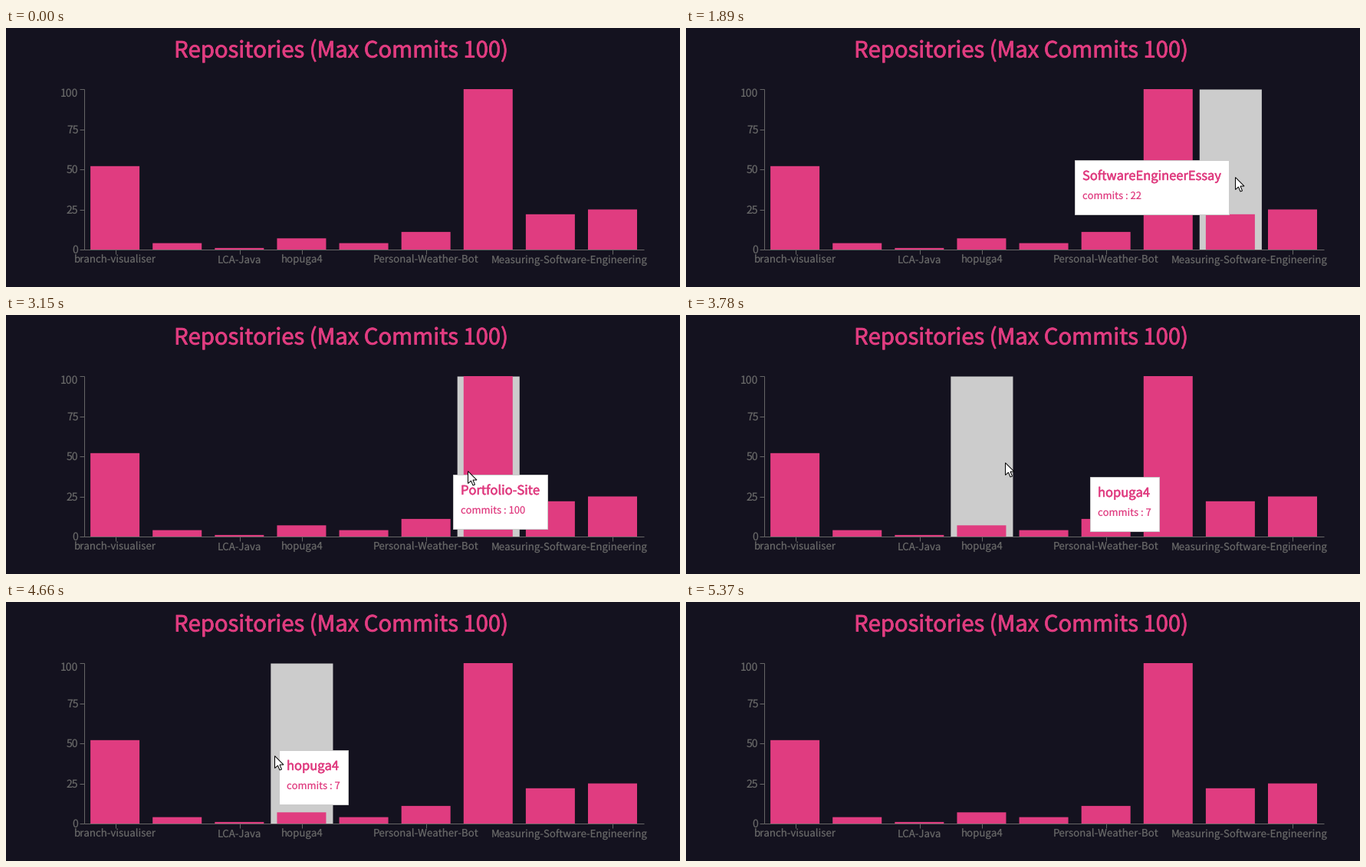
A matplotlib script that plays this animation: 879x339 px, repeating every 5.84 s.

```python
import math

import matplotlib.pyplot as plt
import numpy as np
from matplotlib.animation import FuncAnimation
from matplotlib.patches import Polygon, Rectangle
from matplotlib.patheffects import withStroke

W, H, DPI = 879, 339, 64
INTERVAL, FRAMES = 40, 146
START, STEP, STEPS = 370, 79.4, 63
BG, PINK, GREY, LIGHT = "#14121f", "#e03c80", "#666666", "#cccccc"
LEFT, RIGHT, TOP, BOTTOM = 102, 832, 80, 290
FOLLOW = 0.2
TIP_H, GAP = 72, 10

REPOS = [
    ("branch-visualiser", 52), ("Sudoku-Solver", 4), ("LCA-Java", 1),
    ("hopuga4", 7), ("Sorting-Algorithms", 4), ("Personal-Weather-Bot", 11),
    ("Portfolio-Site", 100), ("SoftwareEngineerEssay", 22),
    ("Measuring-Software-Engineering", 25),
]
BAND = (RIGHT - LEFT) / len(REPOS)

# stops of the pointer: step, x, y
STOPS = np.array([
    (0, 866, 314), (6, 822, 288), (8, 798, 247), (16, 798, 238),
    (19, 716, 195), (23, 712, 204), (27, 714, 193), (38, 560, 208),
    (43, 416, 193), (48, 172, 165), (51, 348, 178), (54, 350, 201),
    (62, 800, 200),
])
ARROW = np.array([(0, 0), (0, 16), (4, 12.5), (6.5, 18.5), (9, 17.5),
                  (6.5, 11.5), (11.5, 11.5)])

plt.rcParams["font.family"] = ["Noto Sans CJK JP"]
plt.rcParams["text.hinting"] = "none"


def px(v):
    return v * 72 / DPI


def label(x, y, s, size, color, ha="center", bold=0, z=3):
    t = ax.text(x, y, s, fontsize=px(size), color=color, ha=ha,
                va="baseline", zorder=z)
    if bold:
        t.set_path_effects([withStroke(linewidth=px(bold), foreground=color)])
    return t


def line(xs, ys):
    ax.plot(xs, ys, color=GREY, lw=px(1), zorder=3, solid_capstyle="butt")


def block(x, y, w, h, color, z):
    return ax.add_patch(Rectangle((x, y), w, h, fc=color, lw=0, zorder=z,
                                  snap=False))


def center(i):
    return LEFT + BAND * (i + 0.5)


def level(v):
    return BOTTOM - (BOTTOM - TOP) * v / 100


fig = plt.figure(figsize=(W / DPI, H / DPI), dpi=DPI, facecolor=BG)
ax = fig.add_axes([0, 0, 1, 1])
ax.set_xlim(0, W)
ax.set_ylim(H, 0)
ax.axis("off")

label(437, 38.5, "Repositories (Max Commits 100)", 29.2, PINK, bold=0.8)

for i, (name, n) in enumerate(REPOS):
    block(LEFT + BAND * (i + 0.1), level(n), 64, BOTTOM - level(n), PINK, 2)

line([LEFT, LEFT], [TOP, BOTTOM])
line([LEFT, RIGHT], [BOTTOM, BOTTOM])
for v in range(0, 101, 25):
    line([LEFT - 6, LEFT], [level(v)] * 2)
    label(94.5, max(level(v), 85) + 5, str(v), 14, GREY, ha="right")
for i in (0, 2, 3, 5, 8):
    x = center(i)
    line([x, x], [BOTTOM, BOTTOM + 6])
    label(min(x, 735), 308, REPOS[i][0], 13.3, GREY)

band = block(LEFT, TOP + 0.5, BAND, BOTTOM - TOP - 0.5, LIGHT, 1)
box = ax.add_patch(Rectangle((0, 0), 1, TIP_H - 1, fc="white", ec=LIGHT,
                             lw=px(1), zorder=5))
head = label(0, 0, "", 16.5, PINK, ha="left", bold=0.5, z=6)
count = label(0, 0, "", 13, PINK, ha="left", z=6)
mouse = ax.add_patch(Polygon(ARROW, fc="white", ec="black", lw=px(1),
                             joinstyle="miter", zorder=8))


def fill_tip(i):
    name, n = REPOS[i]
    head.set_text(name)
    count.set_text(f"commits : {n}")


def tip_width(i):
    fill_tip(i)
    return round(max(t.get_window_extent().width for t in (head, count))) + 21


WIDTHS = [tip_width(i) for i in range(len(REPOS))]


def pointer(k):
    return [np.interp(k, STOPS[:, 0], STOPS[:, c]) for c in (1, 2)]


def hovered(x, y):
    if LEFT <= x < RIGHT and TOP <= y < BOTTOM:
        return int((x - LEFT) / BAND)
    return None


def tip_target(i, y):
    """Right of and below the pointer, flipped where there is no room."""
    x = center(i) + GAP
    if x + WIDTHS[i] > RIGHT:
        x -= WIDTHS[i] + 2 * GAP
    y += GAP
    if y + TIP_H > BOTTOM + 5:
        y -= TIP_H + 2 * GAP
    return np.array([x, y])


def tip_track():
    """Tooltip corner at each step, easing after its target."""
    track, pos, goal = [], None, None
    for k in range(STEPS):
        x, y = pointer(k)
        i = hovered(x, y)
        if pos is not None:
            pos = pos + FOLLOW * (goal - pos)
        if i is not None:
            goal = tip_target(i, y)
            if pos is None:
                pos = goal
        track.append(pos)
    return track


TRACK = tip_track()


def draw(frame):
    k = math.floor((frame * INTERVAL + 30 - START) / STEP)
    active = 0 <= k < STEPS
    i = None
    if active:
        x, y = pointer(k)
        i = hovered(x, y)
        mouse.set_xy(ARROW + np.round([x, y]) + 0.5)
    mouse.set_visible(active)
    for part in (band, box, head, count):
        part.set_visible(i is not None)
    if i is not None:
        band.set_x(LEFT + BAND * i)
        tx, ty = np.round(TRACK[k])
        box.set_xy((tx + 0.5, ty + 0.5))
        box.set_width(WIDTHS[i] - 1)
        fill_tip(i)
        head.set_position((tx + 11, ty + 27))
        count.set_position((tx + 11, ty + 52))
    return band, box, head, count, mouse


anim = FuncAnimation(fig, draw, frames=FRAMES, interval=INTERVAL,
                     repeat=True, repeat_delay=0)
plt.show()
```
